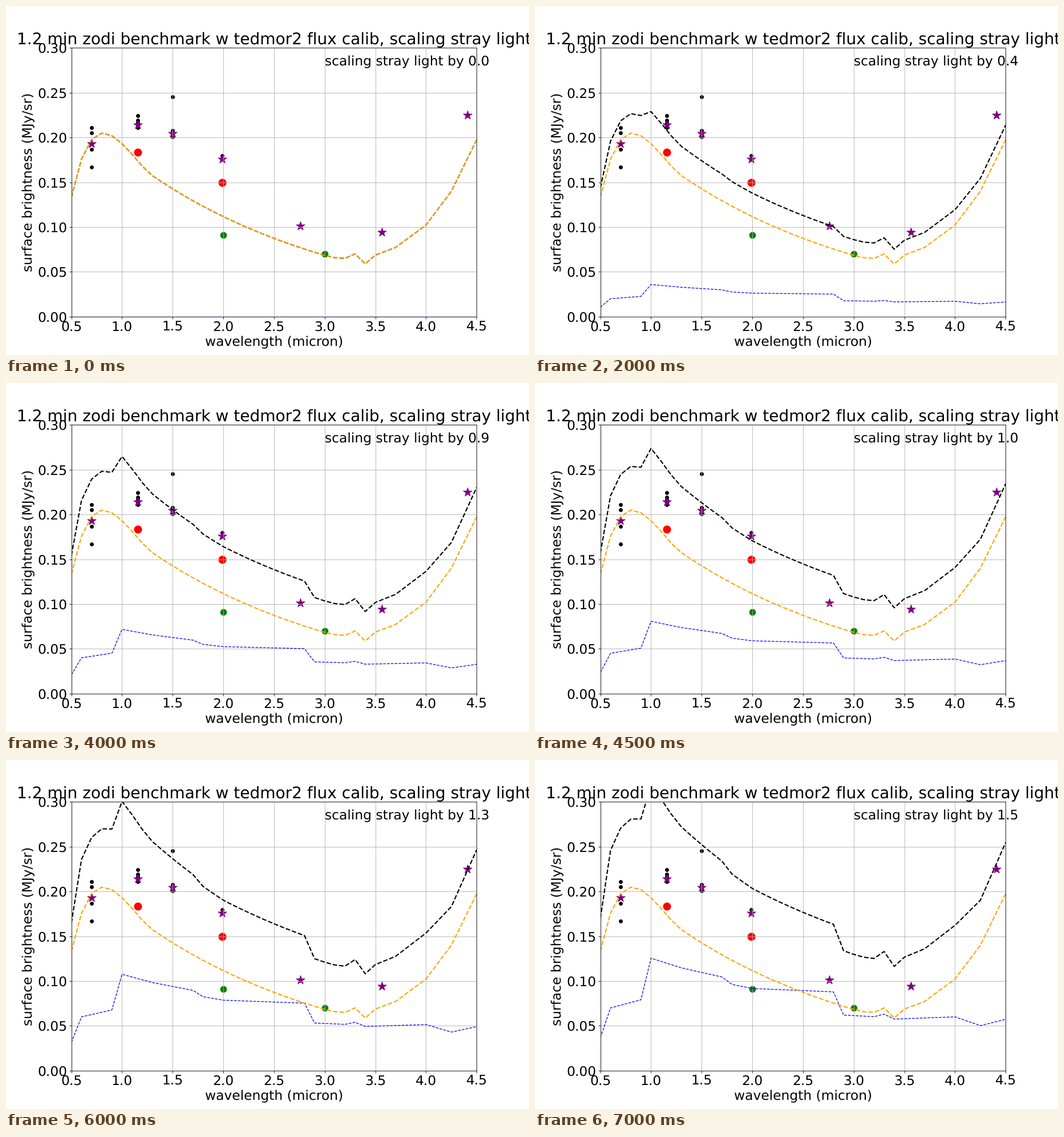
Animation of 917 by 611 pixels, one loop 7500 ms. Source, as a matplotlib script:

```python
import matplotlib.pyplot as plt
import numpy as np
from matplotlib.animation import FuncAnimation

W, H, DPI = 917, 611, 76.4
STEPS, INTERVAL = 15, 500
MAX_SCALE = 1.5

plt.rcParams.update({"font.family": "DejaVu Sans", "font.size": 22,
                     "text.hinting": "none"})


def zodi_light(x):
    """Scattered-light peak, exponential decay, dip, then thermal rise."""
    peak = np.polyval([-.4, .733, -.494, .0137, .2048], x - .8)
    decay = .1573 * np.exp(-.49 * (x - 1.3))
    dip = np.interp(x, [3.1, 3.2, 3.3, 3.4, 3.5],
                    [.0658, .0650, .0700, .0588, .0687])
    t = np.maximum(x - 3.5, 0)
    rise = .0687 + .035 * t + .0938 * t ** 2.55
    return np.select([x < 1.25, x < 3.05, x < 3.45], [peak, decay, dip], rise)


def stray_light(x):
    """Stray light at full scale, as straight runs between its steps."""
    knots = [(.5, .0367), (.6, .0700), (.9, .0790), (1.0, .1255),
             (1.3, .1147), (1.7, .1045), (1.8, .0962), (2.0, .0917),
             (2.8, .0879), (2.9, .0620), (3.2, .0602), (3.3, .0630),
             (3.4, .0575), (4.0, .0600), (4.25, .0502), (4.5, .0573)]
    return np.interp(x, *zip(*knots))


wave = np.r_[np.arange(5, 36) / 10, 3.7, 4.0, 4.25, 4.5]
zodi, stray = zodi_light(wave), stray_light(wave)

fig, ax = plt.subplots(figsize=((W + 1e-6) / DPI, (H + 1e-6) / DPI), dpi=DPI)
fig.subplots_adjust(left=.125, right=.9, bottom=.11, top=.88)
ax.set(xlim=(.5, 4.5), ylim=(0, .3),
       xlabel="wavelength (micron)", ylabel="surface brightness (MJy/sr)")
ax.set_xticks(np.arange(.5, 4.6, .5))
ax.set_yticks(np.arange(0, .31, .05))
ax.grid(True)
ax.set_title("1.2 min zodi benchmark w tedmor2 flux calib, "
             "scaling stray light")

# Measured fields, grouped by band
fields = {.7: [.211, .205, .187, .167], 1.153: [.2243, .219, .2165, .2112],
          1.5: [.2455, .208, .204, .201], 1.99: [.18, .176]}
for x, ys in fields.items():
    ax.scatter([x] * len(ys), ys, s=30, c="black")
ax.scatter([1.153, 1.99], [.1835, .15], s=150, c="red")
ax.scatter([2, 3], [.091, .07], s=100, c="green")
ax.scatter([.7, 1.153, 1.5, 1.99, 2.76, 3.565, 4.41],
           [.193, .2142, .2048, .176, .101, .0945, .225],
           s=220, c="purple", marker="*")

stray_line, = ax.plot(wave, 0 * stray, "--", color="blue", lw=1.2)
total_line, = ax.plot(wave, zodi, "--", color="black", lw=2)
ax.plot(wave, zodi, "--", color="orange", lw=2)
label = ax.text(3.0, .28, "")


def update(i):
    part = i / (STEPS - 1)
    stray_line.set_ydata(part * stray)
    total_line.set_ydata(zodi + part * stray)
    label.set_text(f"scaling stray light by {MAX_SCALE * part:.1f}")
    return stray_line, total_line, label


anim = FuncAnimation(fig, update, frames=STEPS, interval=INTERVAL,
                     repeat=True, repeat_delay=0)
plt.show()
```
